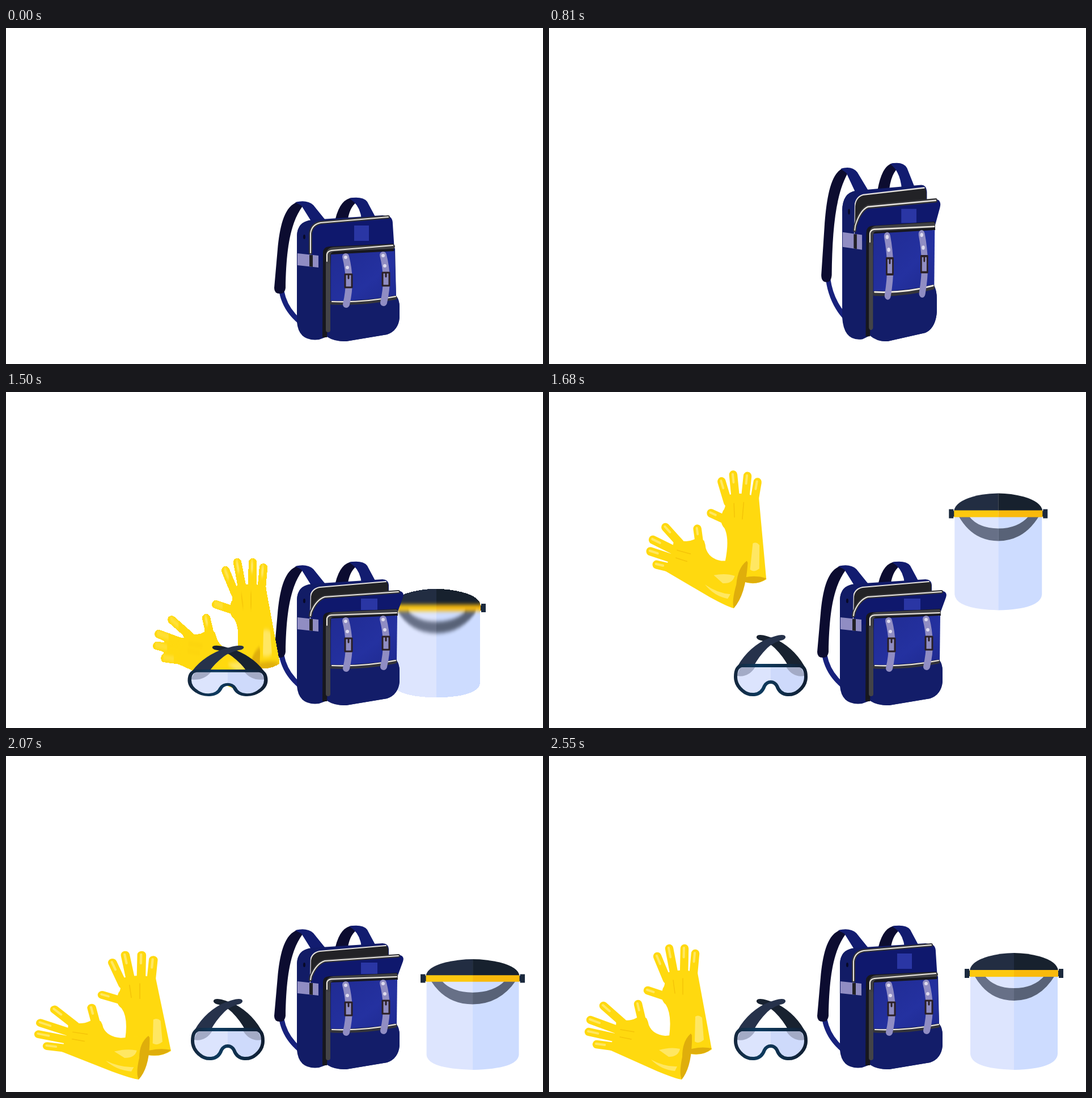
An HTML page that plays this animation: 947 px wide and 592 px high, repeating every 4680 ms.

```html
<!DOCTYPE html>
<html lang="en">
<head>
<meta charset="utf-8">
<title>Safety kit</title>
<style>
html, body { margin: 0; width: 100%; height: 100%; overflow: hidden; background: #fff; }
svg { display: block; width: 100vw; height: 100vh; }
</style>
</head>
<body>
<svg viewBox="0 0 947 592" fill="none" stroke-linecap="round" stroke-linejoin="round">
  <defs>
    <linearGradient id="rim"><stop stop-color="#14283f"/><stop offset=".35" stop-color="#0d3a5e"/><stop offset="1" stop-color="#111f33"/></linearGradient>
    <linearGradient id="flapFill" x2="1" y2="1"><stop stop-color="#202b92"/><stop offset=".6" stop-color="#2431a0"/><stop offset="1" stop-color="#1e298e"/></linearGradient>
    <path id="band" d="M410 428Q418 428 417 433Q415 437 408 438Q393 443 385 451Q370 466 361 483L329 490Q346 455 380 437Q402 428 410 428Z"/>
    <g id="strap">
      <path d="M599 403Q604 422 605 445Q605 465 600 487" stroke="#908dc3" stroke-width="12"/>
      <g fill="#dedbee"><circle cx="599" cy="404" r="3"/><circle cx="602" cy="422" r="3"/></g>
      <path d="M598 434H610V457H598ZM604 434V441" stroke="#2b2026" stroke-width="3"/>
    </g>
  </defs>

  <g id="bagBack">
    <path d="M486 464Q492 495 517 516" stroke="#17217c" stroke-width="9"/>
    <path d="M516 306C491 312 483 348 479 390L473 458Q473 468 483 468Q492 468 493 458C494 395 500 345 523 314Z" fill="#0c0c30"/>
    <path d="M510 307Q531 302 542 312L563 338L541 345L521 313Z" fill="#121c70"/>
    <path d="M581 336Q590 300 612 299L622 304Q607 313 603 336Z" fill="#0c0c30"/>
    <path d="M605 300Q629 296 637 306L652 334L627 337Q625 317 613 306Z" fill="#121c70"/>
    <path d="M513 366Q514 341 540 338L664 330Q674 330 675 340V390H536Z" fill="#111b68"/>
    <path d="M536 400L537 360Q539 347 553 344L668 334Q674 334 674 342V392Z" fill="#222226"/>
    <path d="M536 400L537 360Q539 347 553 344L670 334" stroke="#e6e3df" stroke-width="2"/>
  </g>

  <g id="shield">
    <path d="M743 385V525Q745 551 820 553V385Z" fill="#dde5fe"/>
    <path d="M897 385V525Q895 551 820 553V385Z" fill="#cddcff"/>
    <path d="M750 387Q775 431 820 431V409Q785 409 768 387Z" fill="#677087"/>
    <path d="M892 387Q865 431 820 431V409Q855 409 874 387Z" fill="#586277"/>
    <path d="M742 378Q744 362 775 353Q797 347 820 347V378Z" fill="#222d42"/>
    <path d="M898 378Q896 362 865 353Q843 347 820 347V378Z" fill="#17212e"/>
    <path d="M733 375H741V378H743V388H741V391H733ZM907 375H899V378H897V388H899V391H907Z" fill="#1b293d"/>
    <path d="M742 377H820V389H742Z" fill="#fdc80f"/>
    <path d="M820 377H898V389H820Z" fill="#f9b90b"/>
  </g>

  <g id="gloves">
    <g id="handR"></g>
    <path d="M202 384Q232 372 262 382L287 517Q268 530 246 524L212 494Q217 455 206 438Q194 428 201 409Q207 402 202 384Z" fill="#ffd90f"/>
    <path d="M248 517Q268 511 287 515Q274 529 246 524Z" fill="#dfae0b"/>
    <path d="M258 459Q264 455 270 461L273 500Q264 508 257 503Z" fill="#ffe762"/>
    <path d="M236 392V420M219 395L222 418" stroke="#f4c409" stroke-width="1.5"/>
    <g id="handL"></g>
    <path d="M119 461Q138 470 153 462Q162 456 172 462Q175 468 176 474Q183 491 205 493L250 489Q254 530 234 570Q224 569 190 555L105 517Q118 495 119 461Z" fill="#ffd90f"/>
    <path d="M250 489Q235 502 235 530Q229 559 234 570Q253 547 252 492Z" fill="#dfae0b"/>
    <path d="M194 518Q215 512 231 516Q228 530 211 530ZM180 535Q204 548 226 547L222 555Q198 553 180 535Z" fill="#ffe762"/>
    <path d="M126 482L150 486M125 495L145 499" stroke="#f4c409" stroke-width="1.5"/>
  </g>

  <g id="goggles">
    <use href="#band" transform="matrix(-1 0 0 1 783 0)" fill="#182230"/>
    <use href="#band" fill="#26324b"/>
    <path id="lens" d="M340 482H442Q453 484 453 502Q453 516 441 526Q432 534 420 533Q407 532 402 518Q398 511 391 511Q384 511 380 518Q375 532 362 533Q350 534 341 526Q329 516 329 502Q329 484 340 482Z" fill="#dce4fd"/>
    <path d="M391 482H442Q453 484 453 502Q453 516 441 526Q432 534 420 533Q407 532 402 518Q398 511 391 511Z" fill="#cedafb"/>
    <path d="M331 500Q352 504 364 484H338ZM451 500Q430 504 418 484H444Z" fill="#a3abc6"/>
    <path id="frame" stroke="url(#rim)" stroke-width="6"/>
  </g>

  <g id="bagFront">
    <path d="M513 366Q514 341 537 339L536 400L686 388L688 472Q694 478 694 492V510Q692 533 672 540L600 552Q580 553 566 544L552 549Q516 553 513 518Z" fill="#121c66"/>
    <path id="panel" fill="#0f186d"/>
    <path id="edgeDark" stroke="#343438" stroke-width="6"/>
    <path id="edge" stroke="#e9e6e0" stroke-width="2"/>
    <rect id="badge" fill="#2a36a4"/>
    <ellipse cx="526" cy="368" rx="2" ry="4" fill="#080a28"/>
    <path d="M514 397L551 401V422L514 418Z" fill="#908dc3"/>
    <path d="M535 400L541 400V421L535 420Z" fill="#222126"/>
    <path id="pocketEdge" fill="#17171e"/>
    <path id="flap" fill="url(#flapFill)"/>
    <path d="M573 485Q630 486 688 475Q694 480 694 492V510Q692 533 672 540L600 552Q584 553 567 544L573 530Z" fill="#131d69"/>
    <path d="M568 412V532" stroke="#434347" stroke-width="8"/>
    <path id="trim" stroke="#404044" stroke-width="8"/>
    <path id="piping" stroke="#eeeae3" stroke-width="2"/>
    <path d="M575 484Q632 486 686 475" stroke="#35353a" stroke-width="7"/>
    <path d="M575 482Q632 484 687 473" stroke="#f0ece5" stroke-width="2.2"/>
    <use href="#strap"/>
    <use href="#strap" x="66" y="-3"/>
  </g>
</svg>
<script>
const NS = 'http://www.w3.org/2000/svg';
const LOOP = 4680, STEP = 30;
const el = id => document.getElementById(id);
const ease = {
  l: u => u,
  o: u => 1 - (1 - u) * (1 - u),
  i: u => u * u,
  s: u => u * u * (3 - 2 * u)
};

function make(tag, attrs, parent) {
  const n = document.createElementNS(NS, tag);
  for (const k in attrs) n.setAttribute(k, attrs[k]);
  parent.appendChild(n);
  return n;
}

// Keys are [time, value, easing into this key].
function at(t, keys) {
  if (t <= keys[0][0]) return keys[0][1];
  for (let i = 1; i < keys.length; i++) {
    const [t0, a] = keys[i - 1], [t1, b, e = 'l'] = keys[i];
    if (t < t1) return a + (b - a) * ease[e]((t - t0) / (t1 - t0));
  }
  return keys[keys.length - 1][1];
}

function morph(a, b, u) {
  const to = b.match(/[\d.]+/g);
  let i = 0;
  return a.replace(/[\d.]+/g, n => +n + (to[i++] - n) * u);
}

// Closed and open outlines of the parts that bend.
const bends = {
  panel: ['M536 412L537 362Q539 344 555 341L670 331Q682 331 682 345L685 392Z',
          'M536 412L538 388Q547 364 562 359L688 350Q704 350 700 362L689 392Z'],
  edge: ['M537 396L537 362Q539 346 555 343L674 333',
         'M537 394L538 388Q547 366 562 361L692 352'],
  pocketEdge: ['M558 545L559 396Q559 386 570 385L683 380L684 394L573 400L566 545Z',
               'M558 545L559 398Q559 389 570 388L690 382L691 394L573 400L566 545Z'],
  trim: ['M568 412L568 400Q569 391 578 390L682 385', 'M568 412L568 401Q569 393 578 392L687 387'],
  piping: ['M566 411L566 399Q567 393 574 392L682 383', 'M566 411L566 399Q567 394 574 393L689 389'],
  flap: ['M573 399L685 393L688 474L573 483Z', 'M573 399L690 394L689 474L573 483Z']
};
bends.edgeDark = bends.edge;

// Each finger: base x, y, tip x, y; the thumb comes last.
const hands = {
  handR: [[208, 394, 191, 353], [221, 386, 212, 339], [238, 386, 239, 339], [254, 392, 258, 348], [207, 424, 174, 413]],
  handL: [[130, 470, 96, 440], [122, 483, 73, 465], [120, 497, 70, 486], [128, 514, 84, 508], [165, 471, 157, 437]]
};
const fingers = [];
for (const id in hands) for (const f of hands[id]) {
  const base = make('line', { stroke: '#ffd90f', 'stroke-width': 14.5 }, el(id));
  const shine = make('line', { stroke: '#ffe762', 'stroke-width': 4 }, el(id));
  fingers.push({ f, base, shine });
}

function setLine(n, x1, y1, x2, y2) {
  Object.entries({ x1, y1, x2, y2 }).forEach(([k, v]) => n.setAttribute(k, v));
}

const items = {
  goggles: {
    px: 391, py: 536, smear: 4,
    x: [[1015, 223], [1380, 0]],
    y: [[1015, -30], [1100, -394, 'o'], [1380, 0, 'i']],
    sx: [[1380, 1], [1440, 1.15, 'o'], [1500, 1.085], [1560, 1, 'o']],
    sy: [[1380, 1], [1440, .75, 'o'], [1500, .826], [1560, 1, 'o']]
  },
  gloves: {
    px: 235, py: 570, smear: 2,
    x: [[1200, 430], [1500, 196], [1830, 5], [1865, 0]],
    y: [[1160, -40], [1340, -298, 'o'], [1480, 0, 'i'], [1665, -190, 'o'], [1865, 0, 'i']],
    size: [[1080, .3], [1200, .4], [1380, 1]],
    sx: [[1865, 1], [1935, 1.273, 'o'], [2070, 1.0756, 's'], [2130, 1, 'o']],
    sy: [[1600, 1], [1830, 1.15], [1865, 1.1], [1935, .8, 'o'], [2070, .95, 's'], [2130, 1, 'o']],
    turn: [[1560, 0], [1830, 12, 's'], [1930, 0, 's']]
  },
  shield: {
    px: 767, py: 553, smear: 2,
    x: [[1200, -169], [1500, -61], [1830, 0]],
    y: [[1160, -25], [1340, -260, 'o'], [1495, -5, 'i'], [1665, -170, 'o'], [1830, 0, 'i']],
    size: [[1080, .5], [1200, .65], [1380, 1]],
    sx: [[1830, 1], [1920, 1.16, 'o'], [2070, 1.0575, 's'], [2130, 1, 'o']],
    sy: [[1400, 1], [1500, .93], [1600, 1], [1830, 1], [1920, .82, 'o'], [2070, .947, 's'], [2130, 1, 'o']],
    turn: [[1200, 7], [1450, 0, 's']]
  }
};
const still = [[0, 0]], full = [[0, 1]];

// Vertical smear that keeps a crisp silhouette.
for (const id in items) {
  const f = make('filter', { id: id + 'Blur', 'color-interpolation-filters': 'sRGB' }, document.querySelector('defs'));
  items[id].blur = make('feGaussianBlur', { stdDeviation: '0 0' }, f);
  make('feFuncA', { type: 'discrete', tableValues: '0 1' }, make('feComponentTransfer', {}, f));
}

function place(node, px, py, dx, dy, sx, sy, turn = 0) {
  node.setAttribute('transform',
    `translate(${px + dx} ${py + dy}) scale(${sx} ${sy}) rotate(${turn}) translate(${-px} ${-py})`);
}

function drawItem(id, t) {
  const m = items[id], node = el(id);
  node.style.display = t < 1015 ? 'none' : '';
  const size = at(t, m.size || full);
  place(node, m.px, m.py, at(t, m.x), at(t, m.y),
    size * at(t, m.sx), size * at(t, m.sy), at(t, m.turn || still));
  const speed = Math.abs(at(t + 5, m.y) - at(t - 5, m.y)) / 10;
  const smear = Math.min(7, speed * m.smear / size);
  m.blur.setAttribute('stdDeviation', `0 ${smear}`);
  if (smear > .4) node.setAttribute('filter', `url(#${id}Blur)`);
  else node.removeAttribute('filter');
}

// Squash, stretch and settle, played once to open and once to close.
const bounce = (a, b) => [[0, 1], [150, a, 's'], [330, b, 's'], [480, 1, 's']];

function drawBag(t) {
  const s = t < 2070 ? t - 480 : t - 2070;
  const sx = at(s, bounce(1.13, .922)), sy = at(s, bounce(.82, 1.241));
  place(el('bagBack'), 565, 552, 0, 0, sx, sy);
  place(el('bagFront'), 565, 552, 0, 0, sx, sy);
  const open = at(t, [[630, 0], [790, 1, 's'], [2230, 1], [2390, 0, 's']]);
  for (const id in bends) el(id).setAttribute('d', morph(...bends[id], open));
  const box = { x: 614 + 12 * open, y: 348 + 16 * open, width: 26 + 3 * open, height: 27 - 7 * open };
  for (const k in box) el('badge').setAttribute(k, box[k]);
}

function draw(t) {
  drawBag(t);
  for (const id in items) drawItem(id, t);
  const reach = at(t, [[1600, 1], [1830, .35, 's'], [1940, 1, 's']]);
  for (const { f: [x, y, tx, ty], base, shine } of fingers) {
    const dx = (tx - x) * reach, dy = (ty - y) * reach;
    setLine(base, x, y, x + dx, y + dy);
    setLine(shine, x + dx * .65 - 1, y + dy * .65 - 1, x + dx - 1, y + dy - 1);
  }
}

el('frame').setAttribute('d', el('lens').getAttribute('d'));
const start = performance.now();
function tick() {
  const t = (performance.now() - start) % LOOP;
  draw(Math.floor(t / STEP) * STEP);
  requestAnimationFrame(tick);
}
tick();
</script>
</body>
</html>
```
